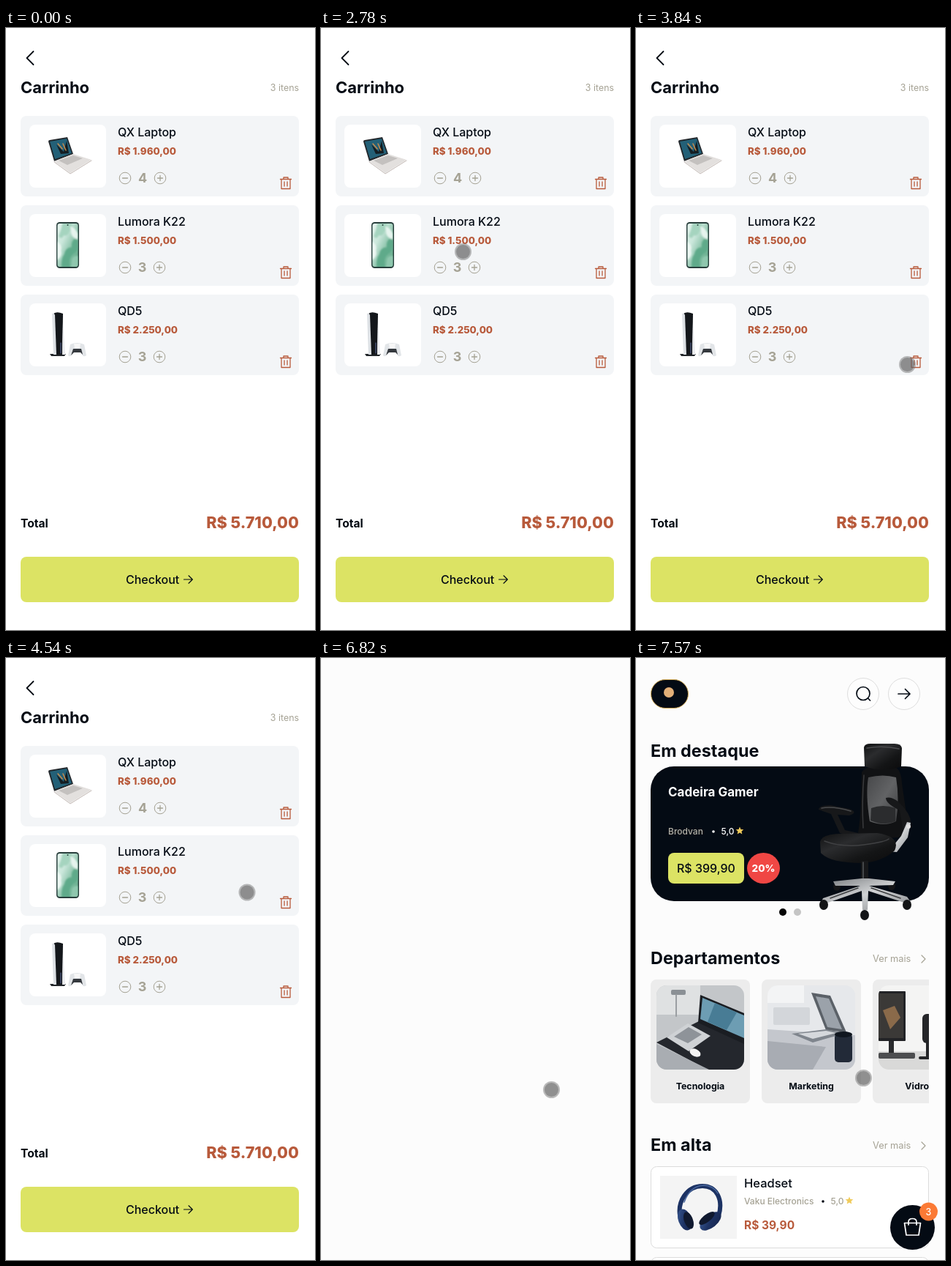
These frames come from a looping animation (423 px wide and 822 px high, 8000 ms). An HTML page:

```html
<!DOCTYPE html>
<html lang="pt-BR">
<head>
<meta charset="utf-8">
<title>Carrinho</title>
<style>
  html, body { margin: 0; width: 100%; height: 100%; overflow: hidden; background: #fff; }
  svg { display: block; font-family: Inter, "Open Sans", sans-serif; }
  #stage { width: 100vw; height: 100vh; }
</style>
</head>
<body>
<svg id="stage" viewBox="0 0 423 822"></svg>
<script>
const INK = '#040b14', RUST = '#b85a3b', MUTED = '#a5a294', LIME = '#dce364';
const LOOP = 8000;

// Drawing helpers: each returns SVG markup.
const text = (x, y, str, size, weight = 400, fill = INK, anchor = 'start') =>
  `<text x="${x}" y="${y}" font-size="${size}" font-weight="${weight}" fill="${fill}" text-anchor="${anchor}">${str}</text>`;
const rect = (x, y, w, h, r, fill, stroke = 'none') =>
  `<rect x="${x}" y="${y}" width="${w}" height="${h}" rx="${r}" fill="${fill}" stroke="${stroke}"/>`;
const circle = (x, y, r, fill, stroke = 'none') =>
  `<circle cx="${x}" cy="${y}" r="${r}" fill="${fill}" stroke="${stroke}"/>`;
const oval = (x, y, rx, ry, fill, turn = 0) =>
  `<ellipse cx="${x}" cy="${y}" rx="${rx}" ry="${ry}" fill="${fill}" transform="rotate(${turn} ${x} ${y})"/>`;
const line = (d, stroke, width = 1.3) =>
  `<path d="${d}" fill="none" stroke="${stroke}" stroke-width="${width}" stroke-linecap="round" stroke-linejoin="round"/>`;
const shape = (d, fill) => `<path d="${d}Z" fill="${fill}"/>`;
const at = (x, y, art) => `<g transform="translate(${x} ${y})">${art}</g>`;
const soft = art => `<g filter="url(#soft)">${art}</g>`;

let clipCount = 0;
function clipped(x, y, w, h, r, art) {
  const id = 'clip' + clipCount++;
  return `<clipPath id="${id}">${rect(x, y, w, h, r, '#000')}</clipPath><g clip-path="url(#${id})">${art}</g>`;
}

const gradient = (id, ...colors) => `<linearGradient id="${id}" x2="1" y2="1">` +
  colors.map((c, i) => `<stop offset="${i / (colors.length - 1)}" stop-color="${c}"/>`).join('') + '</linearGradient>';
const defs = '<defs><filter id="soft"><feGaussianBlur stdDeviation="3"/></filter>' +
  gradient('mint', '#eaf6f1', '#c9e6da', '#7dbb9f', '#5da685') +
  gradient('leather', '#101112', '#2b2c2e', '#141516', '#0b0b0c') +
  gradient('mesh', '#47484a', '#626365', '#3a3b3d') +
  gradient('chrome', '#74777a', '#d0d2d4', '#85888b') +
  gradient('navy', '#3b5c97', '#1d3263', '#16244a') + '</defs>';

function star(x, y) {
  const points = Array.from({ length: 10 }, (_, i) => {
    const a = i * Math.PI / 5 - Math.PI / 2, r = i % 2 ? 2.6 : 5.6;
    return `${(x + r * Math.cos(a)).toFixed(1)},${(y + r * Math.sin(a)).toFixed(1)}`;
  });
  return `<polygon points="${points}" fill="#f0cb5a"/>`;
}

// Product pictures
const laptop =
  shape('M58 155Q58 153 60 153L84 149L92 172L66 182', '#23272b') +
  shape('M60 155L83 151L90 171L67 179', '#236077') +
  shape('M69 159L79 169L83 154L86 171L75 172', '#141d22') +
  line('M71 158L77 165M78 158L82 167', '#c88b4b', 1.5) +
  shape('M66 182L92 172L117 180L88 198', '#e3e0de') +
  shape('M72 181L92 174L105 178L84 187', '#c4c1bf') +
  line('M66 183L88 199L117 181', '#c2b8b4', 1);

const phoneScreen = rect(0, 0, 100, 190, 0, 'url(#mint)') + soft(
  shape('M100 60Q62 70 70 102Q38 104 34 132Q18 150 22 190H62Q50 150 78 130T100 100', '#5faa8a') +
  shape('M26 0H70Q76 28 58 38Q48 60 32 52Q18 74 8 56Q20 30 26 0', '#a5d4bf') +
  shape('M62 14Q88 22 98 46V70Q74 66 66 46', '#e6f4ee') +
  shape('M0 78Q24 90 18 116Q26 140 0 158', '#edf7f3') +
  shape('M70 150Q84 134 100 140V190H64', '#8fc7ae'));

const smallPhone =
  rect(69, 265, 31, 63, 4.5, '#29403d') +
  clipped(70.5, 267, 28, 59, 3, `<g transform="translate(70 266) scale(.29 .325)">${phoneScreen}</g>`) +
  circle(84.5, 269, 1, '#29403d');

const gameConsole =
  shape('M60 445H82L80 448H62', '#22262a') +
  shape('M64 391Q68 386 78 390L77 446H68', '#14171b') +
  shape('M63 390Q66 389 67 392L69 446H65', '#dde1e5') +
  shape('M78 403L81 446H77', '#e8eaed') +
  line('M75 430V444', '#5a6b9a', 1) +
  shape('M88 432Q97 428 107 432L110 447Q105 451 103 443H92Q88 451 85 447', '#e2e5e8') +
  shape('M93 431H102L101 437H94', '#f7f7f7') +
  shape('M92 438H103L105 446L102 443H93L89 447', '#34383d');

const chair =
  shape('M309 156Q313 149 323 149H354Q363 152 364 171L370 212L364 244Q340 249 304 239Q307 220 308 196', '#111214') +
  shape('M312 122Q313 117 321 117H354Q363 117 364 123L363 148Q340 157 313 148', 'url(#leather)') +
  line('M316 123Q338 119 360 124', '#4a4b4d', 1.5) +
  shape('M318 163Q338 158 356 163Q361 193 356 223Q340 231 320 223Q314 186 318 163', 'url(#mesh)') +
  shape('M322 205Q338 199 355 205V223Q340 230 321 222', '#2b2c2e') +
  line('M312 160Q309 196 311 232', '#3a3b3d', 1.5) +
  shape('M250 207Q251 201 266 201L292 206Q305 211 292 215L276 214L286 235L304 239L302 246L279 239L267 213', '#17181a') +
  line('M254 205Q270 202 294 209', '#4a4b4d', 1.5) +
  shape('M342 191Q354 188 368 206Q379 219 375 231L366 238L361 208Q342 199 342 191', '#17181a') +
  shape('M371 224L376 225L372 245L357 265L346 264L363 243', 'url(#chrome)') +
  shape('M252 251Q254 241 278 240L330 239Q363 244 354 263Q337 278 310 280Q265 280 253 266', 'url(#leather)') +
  line('M258 250Q282 259 312 255T346 247', '#404143', 1.5) +
  rect(308, 277, 10, 28, 1, '#17181a') + line('M311 279V303', '#55575a', 1.5) +
  [[275, 312], [350, 311]].map(([x, y]) => oval(x, y, 5, 6, '#141517')).join('') +
  shape('M309 301L270 305L273 311L307 311L256 328L253 335L263 334L309 318L310 344H317L318 318L367 334L376 333L371 326L319 311L352 310L355 305L319 301', 'url(#chrome)') +
  line('M304 314L266 328M322 314L362 328', '#3c3e40', 1.5) +
  [[257, 337], [313, 351], [371, 337]].map(([x, y]) => oval(x, y, 6, 7, '#141517')).join('') +
  circle(373, 230, 3, '#e2e2e2');

const headset =
  line('M61 738C55 714 70 693 91 693C110 693 120 711 113 734', '#1c3263', 6) +
  line('M66 715C71 701 80 693 92 692C101 692 108 696 112 703', '#47659c', 1.5) +
  oval(67, 739, 9, 15, 'url(#navy)', -20) + oval(72, 740, 6, 12, '#10192f', -20) +
  oval(102, 741, 17, 9, 'url(#navy)', -38) + oval(97, 737, 13, 5, '#10192f', -38);

// Department pictures, drawn on a 120 x 115 field
const departments = [
  ['Tecnologia',
    rect(0, 0, 120, 115, 0, '#c3c6c9') + rect(0, 0, 60, 40, 0, '#dfe1e2') +
    shape('M0 78L60 48L120 76V115H70', '#24272d') + shape('M0 80L72 115H0', '#a9adb2') +
    shape('M60 13L120 38V80L57 51', '#1a1d22') + shape('M63 17L120 41V72L60 46', '#6d9db3') +
    shape('M80 24L110 37L96 61L70 50', '#487c95') +
    shape('M14 71L43 52L74 69L44 90', '#cfd2d5') + shape('M24 70L44 57L62 67L43 79', '#8e9399') +
    rect(20, 6, 20, 7, 2, '#8b9095') + line('M27 13V42', '#9a9ea2', 2) + oval(53, 92, 8, 5, '#f4f4f4', 25)],
  ['Marketing',
    rect(0, 0, 120, 115, 0, '#e6e8eb') + rect(8, 30, 50, 24, 2, '#d3d6da') + rect(0, 0, 50, 24, 0, '#f3f4f5') +
    shape('M0 60L120 68V115H0', '#c4c7cd') + shape('M0 76L80 84L62 115H0', '#a8acb3') +
    shape('M60 10L86 14L108 64L80 61', '#5b6168') + shape('M66 15L84 18L102 60L82 57', '#9ba2aa') +
    shape('M33 66L80 60L108 65L62 78', '#7f858d') + shape('M42 66L80 62L94 65L62 73', '#d5d8dc') +
    rect(92, 66, 24, 39, 5, '#222a38') + oval(104, 67, 12, 4, '#10161f')],
  ['Vidrovo',
    rect(0, 0, 120, 115, 0, '#f4f4f3') + rect(0, 90, 120, 25, 0, '#d9d9d8') +
    rect(0, 8, 37, 68, 1, '#222326') + rect(0, 11, 34, 61, 0, '#3b3937') +
    shape('M6 34L22 28L30 44L16 60', '#8a6a4a') + rect(14, 76, 7, 18, 0, '#2a2b2d') +
    rect(60, 39, 14, 40, 6, '#242528') + line('M67 75V97M57 99H77', '#242528', 4) +
    rect(84, 49, 32, 39, 6, '#d0d0ce') + rect(0, 92, 50, 8, 2, '#4c4d4f')],
  ['Fotografia',
    rect(0, 0, 120, 115, 0, '#8b8d90') + rect(0, 84, 120, 31, 0, '#6c6e70') +
    shape('M22 16L47 23L44 47L20 42', '#e4e4e4') + line('M34 43L34 99M34 71L20 101M34 71L50 101', '#2d2f31', 3) +
    rect(58, 36, 23, 22, 3, '#333538') + line('M70 58V77L56 102M70 77L87 102', '#333538', 4) +
    rect(88, 68, 20, 29, 2, '#484a4d')],
  ['Escritório',
    rect(0, 0, 120, 115, 0, '#4a443e') + shape('M0 0H47L43 48L0 70', '#c49a58') +
    shape('M36 20L94 12L99 77L43 83', '#15202d') + shape('M43 28L88 20L91 69L48 75', '#2a83c4') +
    circle(66, 49, 13, '#8ad4f2') + rect(90, 13, 25, 86, 0, '#242c36') + shape('M0 76L120 94V115H0', '#282522')],
];

// Cart screen
const trash = line('M-7.5 -5.5H7.5M-6 -5.5V7.5H6V-5.5M-3 -5.5V-8H3V-5.5M-2 -2V4M2 -2V4', RUST, 1.3);

function cartItem(y, name, price, quantity, art) {
  const plusX = quantity === 4 ? 211 : 210;
  return rect(20, y, 381, 110, 8, '#f3f5f7') + rect(32, y + 12, 105, 86, 8, '#fff') + art +
    text(153, y + 28, name, 16, 500) + text(153, y + 53, 'R$ ' + price, 13.3, 800, RUST) +
    circle(163, y + 85, 7.8, 'none', MUTED) + line(`M159.5 ${y + 85}h7`, MUTED) +
    text((163 + plusX) / 2, y + 91, quantity, 18, 700, MUTED, 'middle') +
    circle(plusX, y + 85, 7.8, 'none', MUTED) + line(`M${plusX - 3.5} ${y + 85}h7m-3.5 -3.5v7`, MUTED) +
    at(383, y + 92, trash);
}

const cart =
  rect(0, 0, 423, 822, 0, '#fff') + line('M37.5 32L28.5 41L37.5 50', INK, 1.8) +
  text(20, 89, 'Carrinho', 22, 700) + text(401, 86, '3 itens', 12.4, 400, MUTED, 'end') +
  cartItem(120, 'QX Laptop', '1.960,00', 4, laptop) +
  cartItem(242, 'Lumora K22', '1.500,00', 3, smallPhone) +
  cartItem(364, 'QD5', '2.250,00', 3, gameConsole) +
  text(20, 682, 'Total', 15.6, 700) + text(401, 683, 'R$ 5.710,00', 21.6, 800, RUST, 'end') +
  rect(20, 722, 381, 62, 8, LIME) + text(164, 759, 'Checkout', 16, 500) +
  line('M243.5 753H255M250 747.8L255.3 753L250 758.2', INK, 1.2);

// Home screen
const sectionTitle = (y, title, more = true) => text(20, y, title, 23.4, 700) +
  (more ? text(324, y - 3, 'Ver mais', 12.8, 400, MUTED) + line(`M391 ${y - 12}l5 5l-5 5`, MUTED, 1.2) : '');

const rating = (x, y, color) => circle(x, y - 4, 1.8, color) +
  text(x + 10.5, y, '5,0', 12, 500, color === INK ? MUTED : color) + star(x + 36, y - 5);

function featured(x, w, h, name, maker, ready) {
  const left = x + 24;
  const [badgeX, badgeY, badgeRy] = ready ? [x + 154.5, 287, 21] : [x + 151.5, 288, 22];
  return rect(x, 148, w, h, 32, INK) + text(left, 189, name, 17, 700, '#fff') +
    text(left, 241, maker, 12, 500, '#b5b2a8') + rating(x + 86, 241, '#fff') +
    (ready ? rect(left, 266, 104, 42, 8, LIME) : '') +
    text(left + 12, 293, 'R$ 399,90', ready ? 16 : 15.5, ready ? 500 : 400, ready ? INK : '#fff') +
    oval(badgeX, badgeY, 22.5, badgeRy, '#f04744') +
    text(badgeX, badgeY + 5, '20%', 13.5, 800, '#fff', 'middle');
}

const largePhone = rect(268, 144, 107, 190, 0, '#22282a') +
  `<svg x="273" y="144" width="97" height="190" viewBox="0 0 100 190" preserveAspectRatio="none">${phoneScreen}</svg>` +
  line('M271.5 144V334M371.5 144V334', '#8b9494', 1) + line('M374.5 182V212M374.5 225V256', '#343b3c', 3);

function department([name, art], i, ready) {
  const x = 20 + i * (ready ? 152 : 76.2), y = ready ? 439 : 411;
  const [w, h] = ready ? [136, 169] : [76.2, 106];
  const [pw, ph, r] = ready ? [120, 115, 14] : [60, 52, 6];
  const photo = `<svg x="${x + 8}" y="${y + 8}" width="${pw}" height="${ph}" viewBox="0 0 120 115" preserveAspectRatio="xMidYMid slice">${art}</svg>`;
  return rect(x, y, w, h, 8, '#ececec') + clipped(x + 8, y + 8, pw, ph, r, photo) +
    text(x + w / 2, y + (ready ? 150 : 87), name, 12.4, 700, INK, 'middle');
}

const trendCard = (y, name, art, price) =>
  rect(20.5, y + .5, 380, 111, 8, '#fff', '#dcdcdc') + rect(33, y + 13, 105, 86, 0, '#f4f4f4') + art +
  text(148, y + 29, name, 16.5, 500) + text(148, y + 52, 'Vaku Electronics', 12, 500, MUTED) +
  rating(256, y + 52, INK) + text(148, y + 86, 'R$ 39,90', 15.5, 700, price);

function home(ready) {
  const shift = ready ? 28 : 0;
  const price = ready ? RUST : '#bc6a33';
  const header = rect(20.5, 29.5, 51, 39, 19.5, INK, '#d5ad59') + circle(367, 49, 21.5, '#fdfdfd', '#dedede') +
    (ready
      ? circle(45, 47, 7, '#e3b078') + circle(311, 49, 21.5, '#fdfdfd', '#dedede') +
        `<circle cx="311" cy="48.5" r="9" fill="none" stroke="${INK}" stroke-width="1.7"/>` +
        line('M317.5 55L320.5 58', INK, 1.7) + line('M359 49H375M368.5 42.5L375 49L368.5 55.5', INK, 1.7)
      : '');
  const hero = ready
    ? featured(20, 381, 184, 'Cadeira Gamer', 'Brodvan', true) + chair +
      circle(201, 347, 5, '#050505') + circle(221, 347, 5, '#c5c5c5')
    : featured(20, 191, 186, 'Cadeira Gamer', 'Brodvan', false) +
      featured(211, 190, 186, 'Lumora K22', 'Orvitel', false) + largePhone;
  const bag = line('M367.5 771.5H389.5L387 788H370ZM373 774V770Q373 765.5 378.5 765.5T384 770V774', '#fff', 1.7);
  return rect(0, 0, 423, 822, 0, '#fcfcfc') + header + sectionTitle(135, 'Em destaque', false) + hero +
    sectionTitle(390 + shift, 'Departamentos') +
    clipped(20, 400, 381, 220, 0, departments.map((d, i) => department(d, i, ready)).join('')) +
    sectionTitle(645 + shift, 'Em alta') +
    trendCard(666 + shift, 'Headset', at(0, shift, headset), price) +
    trendCard(790 + shift, 'Monitor', rect(54, 814 + shift, 64, 40, 0, '#101114'), price) +
    circle(378.5, 777.5, 30.5, INK) + bag + circle(400.5, 756, 12.5, '#fb7a35') +
    text(400.5, 760.5, ready ? 3 : 0, 12.5, 500, '#fff', 'middle');
}

// Screens by start time
const screens = [[0, cart], [6820, rect(0, 0, 423, 822, 0, '#fcfcfc')], [7230, home(false)], [7300, home(true)]];

// Pointer strokes: start time, then [step, x, y] along the way; one step lasts 70 ms.
const STEP = 70;
const strokes = [
  [1010, [0, 397.5, 793.5], [2, 375, 705], [3, 343, 650], [4, 318, 632], [5, 276, 623], [7, 240, 615], [8, 225.5, 610.5]],
  [1770, [0, 225, 610], [1, 224.5, 609.5]],
  [2170, [0, 215, 601], [1, 208.5, 593.5]],
  [2570, [0, 202, 565], [3, 194.5, 305.5], [5, 213, 190], [6, 240, 176.5], [8, 292.5, 260], [11, 250, 440]],
  [3420, [0, 185, 435], [2, 105.5, 211], [3, 203, 72.5], [4, 300, 170], [6, 371.5, 459.5], [7, 371.5, 511], [9, 275, 599.5], [11, 210, 590]],
  [4260, [0, 168.5, 495], [2, 200, 195.5], [4, 330, 320], [6, 389.5, 615], [8, 252, 650.5], [10, 300, 541], [11, 334.5, 594.5]],
  [5160, [0, 328, 593], [2, 315.5, 589.5]],
  [7230, [0, 315.5, 589.5], [4, 311.5, 573.5]],
];

function pointerAt(t) {
  const stroke = strokes.findLast(([start]) => start <= t);
  if (!stroke) return null;
  const [start, ...keys] = stroke;
  const step = Math.floor((t - start) / STEP);
  const next = keys.findIndex(key => key[0] > step);
  if (next < 0) return keys.at(-1).slice(1);
  const [s0, x0, y0] = keys[next - 1], [s1, x1, y1] = keys[next];
  const u = (step - s0) / (s1 - s0);
  return [x0 + (x1 - x0) * u, y0 + (y1 - y0) * u];
}

const stage = document.getElementById('stage');
stage.innerHTML = defs + screens.map(([, art]) => `<g>${art}</g>`).join('') +
  `<g>${circle(0, 0, 11.5, 'rgba(120,120,120,.5)')}${circle(0, 0, 9.5, 'rgba(85,85,85,.42)')}</g>`;
const groups = [...stage.children].slice(1);
const pointer = groups.pop();
const origin = performance.now();

function draw() {
  const t = (performance.now() - origin) % LOOP;
  const current = screens.findLastIndex(([start]) => start <= t);
  groups.forEach((group, i) => group.style.display = i === current ? '' : 'none');
  const spot = pointerAt(t);
  pointer.style.display = spot ? '' : 'none';
  if (spot) pointer.setAttribute('transform', `translate(${spot})`);
  requestAnimationFrame(draw);
}
draw();
</script>
</body>
</html>
```
